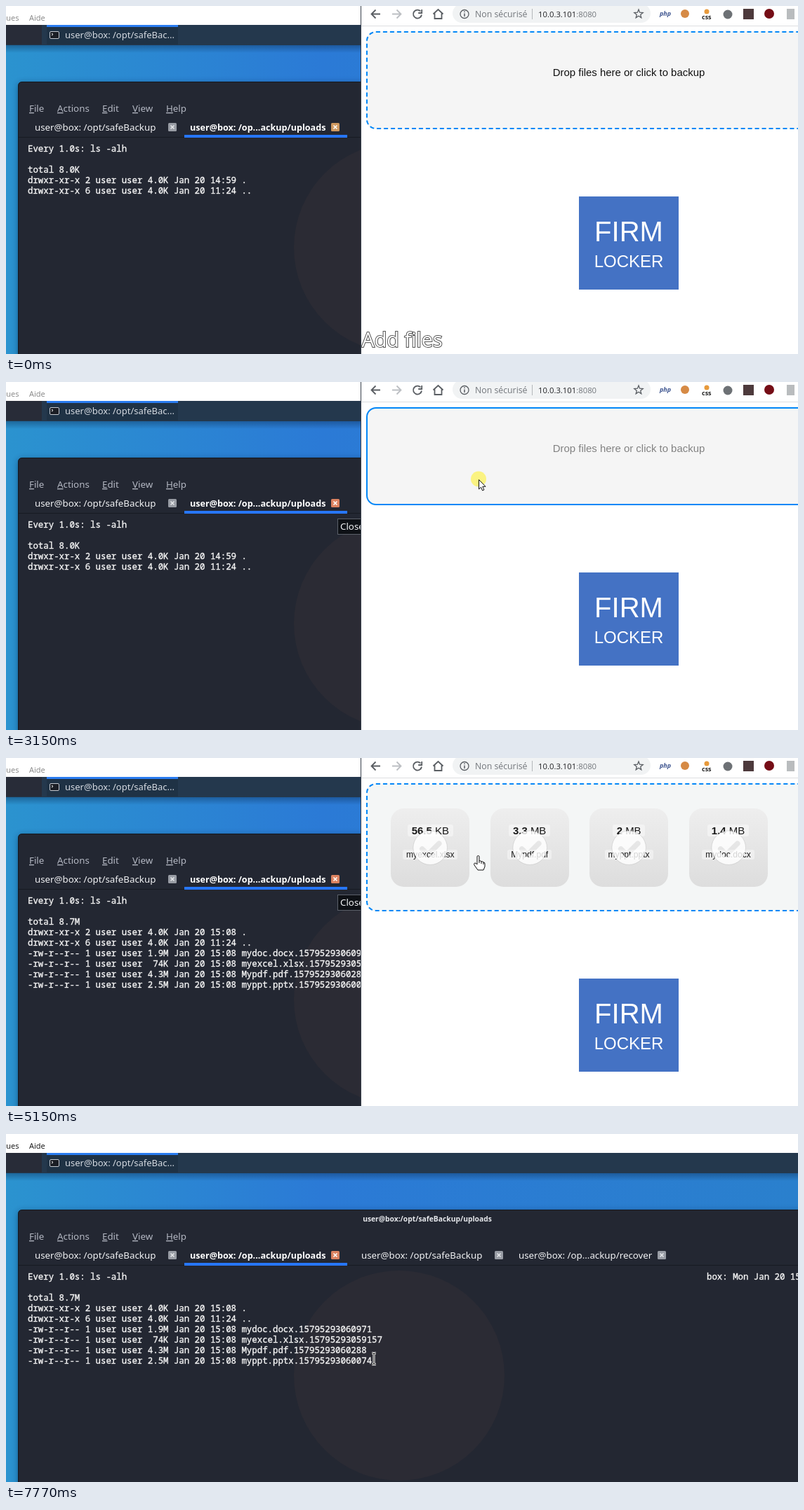
Write an HTML page that moves like this. It is 1128x497 px and loops after 8 s.

```html
<!DOCTYPE html>
<html lang="fr">
<head>
<meta charset="utf-8">
<title>Backup upload</title>
<style>
  html, body { margin: 0; width: 100%; height: 100%; overflow: hidden; background: #fff; }
  #stage { position: relative; width: 1128px; height: 497px; overflow: hidden; }
  #stage > svg { position: absolute; left: 0; top: 0; }
  svg { display: block; }
  .ui { font: 13.3px "Noto Sans", sans-serif; fill: #f2f3f5; }
  .bold { font: bold 12.6px "Noto Sans", sans-serif; fill: #fff; }
  .title { font: bold 10.3px "Noto Sans", sans-serif; fill: #e6e8ec; text-anchor: middle; }
  .menu { fill: #b4b8c3; }
  .menu tspan { text-decoration: underline; }
  .mono { font: 500 12.38px "Noto Sans Mono", monospace; fill: #f6f6f6; stroke: #f6f6f6;
    stroke-width: .35px; white-space: pre; }
  .bar { font: 11px "Open Sans", sans-serif; }
  #browser { position: absolute; left: 505px; top: 0; width: 623px; height: 497px;
    overflow: hidden; background: #fff; }
  #browser > * { position: absolute; }
  #zone { box-sizing: border-box; left: 8px; top: 36px; width: 748px; height: 140px;
    border: 2px dashed #0087f7; border-radius: 14px; background: #f5f5f5; }
  #message { position: absolute; left: 0; right: 0; top: 48px; text-align: center;
    font: 14.93px/17px "Liberation Sans", sans-serif; color: #111; }
  .tile { position: absolute; top: 34px; width: 112px; height: 112px; border-radius: 18.7px;
    overflow: hidden; background: linear-gradient(#eee, #ddd); text-align: center;
    font-family: "Liberation Sans", sans-serif; color: rgba(0,0,0,.9); }
  .tile p { position: absolute; left: 0; right: 0; margin: 0; white-space: nowrap; }
  .tile p span { padding: 0 .4em; border-radius: 3px; background: rgba(255,255,255,.4); }
  .size { top: 23px; font-size: 14.93px; line-height: 18px; }
  .name { top: 57px; font-size: 12.1px; line-height: 18px; }
  .progress { position: absolute; left: 19px; top: 48px; width: 74px; height: 15px;
    border-radius: 7.5px; overflow: hidden; background: rgba(255,255,255,.9); }
  .fill { height: 100%; background: linear-gradient(#666, #444); }
  .mark { position: absolute; left: 31px; top: 31px; }
  #logo { left: 311px; width: 142px; height: 133px; background: #4472c4; color: #fff;
    text-align: center; font-family: "Liberation Sans", sans-serif; }
  #logo div { position: absolute; left: 0; right: 0; line-height: 1; }
  #caption { left: 0; top: 457px; }
</style>
</head>
<body>
<div id="stage">
  <svg id="desktop" width="1128" height="497">
    <defs>
      <linearGradient id="sky">
        <stop offset="0" stop-color="#2b93cf"/>
        <stop offset=".4" stop-color="#2b7ad6"/>
        <stop offset="1" stop-color="#2a80cd"/>
      </linearGradient>
      <linearGradient id="shade" x2="0" y2="1">
        <stop offset="0" stop-color="#0a2a50" stop-opacity=".45"/>
        <stop offset="1" stop-color="#0a2a50" stop-opacity="0"/>
      </linearGradient>
      <filter id="soft"><feGaussianBlur stdDeviation="4"/></filter>
      <mask id="check" maskUnits="userSpaceOnUse" x="0" y="0" width="54" height="54">
        <rect width="54" height="54" fill="#fff"/>
        <path d="M14.7 28.8L23.5 37.5L40.5 20.5" fill="none" stroke="#000" stroke-width="8"
          stroke-linecap="round" stroke-linejoin="round"/>
      </mask>
      <path id="beamShape" d="M-3 -8H-1L0 -7L1 -8H3M0 -7V7M-3 8H-1L0 7L1 8H3"/>
    </defs>
    <rect width="1128" height="497" fill="url(#sky)"/>
    <rect y="55" width="1128" height="12" fill="url(#shade)"/>
    <rect width="1128" height="27" fill="#fff"/>
    <g id="hostMenu" class="bar">
      <text x="18.5" y="21" text-anchor="end">ques</text><text x="33" y="21">Aide</text>
    </g>
    <rect y="27" width="1128" height="29" fill="#24384d"/>
    <rect y="27" width="51" height="28" fill="#282c38"/>
    <rect x="58" y="27" width="187" height="28" fill="#1f3245"/>
    <rect x="58" y="27" width="187" height="3" fill="#2a7cf0"/>
    <rect x="62.5" y="36.5" width="13" height="10" rx="1.5" fill="#1b1e25" stroke="#c4c8cf"/>
    <path d="M65 39l2 1.5l-2 1.5" fill="none" stroke="#fff"/>
    <text class="ui" x="84" y="46" style="font-size:13px;fill:#d5dae1">user@box: /opt/safeBac...</text>

    <rect x="17" y="110" width="1130" height="420" rx="6" fill="#06203f" opacity=".5" filter="url(#soft)"/>
    <path d="M17.5 498V114Q17.5 108.5 23 108.5H1129V498Z" fill="#232732" stroke="#14181f"/>
    <circle cx="560" cy="345" r="150" fill="#2b2b34"/>
    <text class="title" x="600" y="125">user@box:/opt/safeBackup/uploads</text>
    <g id="tabs"></g>
    <rect x="18" y="187" width="1110" height="1" fill="#171a22"/>
    <rect x="254" y="184" width="232" height="4" fill="#2777ff"/>
    <g id="listing"></g>
    <text class="mono" x="998" y="208">box: Mon Jan 20 15:08:34 2020</text>
    <g id="tooltip">
      <rect x="472.5" y="195.5" width="44" height="22" fill="#0e1116" stroke="#5b6069"/>
      <text class="ui" x="476" y="211">Close</text>
    </g>
  </svg>

  <div id="browser">
    <svg width="623" height="29" viewBox="505 0 623 29" fill="none" stroke="#5a5e63" stroke-width="1.8">
      <path d="M505 28.5H1128" stroke="#dcdee1" stroke-width="1"/>
      <path d="M533 11.5H520.5M526.5 5.5l-6 6l6 6"/>
      <path d="M550 11.5H562.5M556.5 5.5l6 6l-6 6" stroke="#bcbfc3"/>
      <path d="M590.5 7.5A6 6 0 1 0 592 12.5M592.2 5v5h-5"/>
      <path d="M608.5 11.5L615.5 5l7 6.5M610.5 10.5V18h10V10.5"/>
      <rect x="636" y="-3" width="282" height="27" rx="13.5" fill="#f1f3f4" stroke="none"/>
      <circle cx="653" cy="11.5" r="6" stroke-width="1.3"/>
      <path d="M653 10.5v4.5M653 7.5v1.5" stroke-width="1.5"/>
      <path d="M749.5 4v15" stroke="#b4b7bb" stroke-width="1"/>
      <path id="star" stroke-width="1.3"/>
      <g class="bar" stroke="none" fill="#72767b">
        <text x="668" y="16" font-size="12.3">Non sécurisé</text>
        <text x="758" y="16" font-size="11.3"><tspan fill="#202124">10.0.3.101</tspan>:8080</text>
        <text x="931" y="14" font-size="9" font-weight="bold" font-style="italic" fill="#3f5690">php</text>
        <text x="991" y="19" font-size="9" font-weight="bold" fill="#222">css</text>
      </g>
      <g stroke="none">
        <circle cx="967" cy="11" r="6" fill="#d68a45"/>
        <circle cx="998" cy="8" r="3.5" fill="#e79a3c"/>
        <circle cx="1028" cy="12" r="6.5" fill="#6d7175"/>
        <rect x="1050" y="4" width="15" height="15" fill="#4d3a3c"/>
        <circle cx="1087" cy="11" r="7" fill="#750d16"/>
        <rect x="1112" y="4" width="11" height="15" fill="#b9bcbe"/>
      </g>
    </svg>
    <div id="zone"><div id="message">Drop files here or click to backup</div><div id="tiles"></div></div>
    <div id="logo">
      <div style="top:30px;font-size:40px">FIRM</div>
      <div style="top:81px;font-size:24px">LOCKER</div>
    </div>
    <svg id="caption" width="140" height="40">
      <text x="1.5" y="30" font-family="Open Sans, sans-serif" font-size="28.8" fill="#fff"
        stroke="#555" stroke-width="2" paint-order="stroke">Add files</text>
    </svg>
    <div style="left:0;top:0;width:1px;height:497px;background:#39414d"></div>
  </div>

  <svg width="1128" height="497">
    <g id="arrow">
      <circle cy="-.5" r="11" fill="#fff23c" opacity=".62"/>
      <path d="M.5 .5V14L3.5 11.2L5.6 16L7.9 15L5.8 10.3H10Z" fill="#fff" stroke="#111"/>
    </g>
    <path id="hand" d="M-2 12V2Q-2 .5 -.5 .5T1 2V8Q3 7 4 9Q6 8 7 10Q9 9.5 9 12V16L7 21H-1L-6 14Q-7 12 -5.5 11Q-4 10.5 -2 13ZM1 8V11M4 9V12M7 10V13"
      fill="#fff" stroke="#111"/>
    <g id="beam" fill="none">
      <use href="#beamShape" stroke="#fff" stroke-width="3"/>
      <use href="#beamShape" stroke="#111"/>
    </g>
  </svg>
</div>

<script>
const $ = id => document.getElementById(id);
const all = selector => document.querySelectorAll(selector);
const clamp = v => Math.min(1, Math.max(0, v));
const easeInOut = p => p < .5 ? 8 * p ** 4 : 1 - 8 * (1 - p) ** 4;
const show = (id, on) => $(id).style.display = on ? "" : "none";
const LOOP = 8000;

$("star").setAttribute("d", "M" + Array.from({ length: 10 }, (_, i) => {
  const a = i * Math.PI / 5, r = i % 2 ? 2.8 : 6.5;
  return [901 + r * Math.sin(a), 11.5 - r * Math.cos(a)].map(v => v.toFixed(1));
}).join("L") + "Z");

const menus = [["File", 33], ["Actions", 73], ["Edit", 137], ["View", 180], ["Help", 228]];
const tabs = [["/opt/safeBackup", 41, 237], ["/op...ackup/uploads", 262, 469],
  ["/opt/safeBackup", 506, 702], ["/op...ackup/recover", 730, 934]];
$("tabs").innerHTML = menus.map(([word, x]) =>
  `<text class="ui menu" x="${x}" y="151"><tspan>${word[0]}</tspan>${word.slice(1)}</text>`).join("") +
  tabs.map(([path, x, close], i) => `
    <text class="${i === 1 ? "bold" : "ui"}" x="${x}" y="178">user@box: ${path}</text>
    <rect ${i === 1 ? 'id="close"' : ""} x="${close - 6}" y="167" width="12" height="12" rx="1.5" fill="#989ca4"/>
    <path d="M${close - 2.5} 170.5l5 5m0 -5l-5 5" stroke="${i === 1 ? "#fff" : "#e4e6e9"}" stroke-width="1.6"/>`).join("");

const files = [["1.9M", "mydoc.docx.15795293060971"], [" 74K", "myexcel.xlsx.15795293059157"],
  ["4.3M", "Mypdf.pdf.15795293060288"], ["2.5M", "myppt.pptx.15795293060074"]];

function listing(total, changed, shown) {
  const row = (mode, links, size, date, name) => `${mode} ${links} user user ${size} Jan 20 ${date} ${name}`;
  const lines = ["Every 1.0s: ls -alh", "", "total " + total,
    row("drwxr-xr-x", 2, "4.0K", changed, "."), row("drwxr-xr-x", 6, "4.0K", "11:24", ".."),
    ...shown.map(([size, name]) => row("-rw-r--r--", 1, size, "15:08", name))];
  return lines.map((line, i) => `<text class="mono" x="31" y="${208 + 15 * i}">${line}</text>`).join("");
}
const listings = [listing("8.0K", "14:59", []),
  listing("2.6M", "15:08", [files[1], files[3]]), listing("8.7M", "15:08", files)];
let listed = -1;

$("tiles").innerHTML = [["56.5", "KB", "myexcel.xlsx"], ["3.3", "MB", "Mypdf.pdf"],
  ["2", "MB", "myppt.pptx"], ["1.4", "MB", "mydoc.docx"]].map(([size, unit, name], i) => `
  <div class="tile" style="left:${33.3 + 141.4 * i}px">
    <p class="size"><span><b>${size}</b> ${unit}</span></p>
    <p class="name"><span>${name}</span></p>
    <div class="progress"><div class="fill"></div></div>
    <svg class="mark" width="50.4" height="50.4" viewBox="0 0 54 54">
      <circle cx="27" cy="27" r="26" fill="#fff" fill-opacity=".816" stroke="#747474"
        stroke-opacity=".2" mask="url(#check)"/>
    </svg>
  </div>`).join("");

function pointer(t, q) {
  if (t < 1900) return null;
  if (q <= 2650) {
    const p = clamp((q - 1900) / 750);
    return ["arrow", 7 + 610 * (1 - (1 - p) ** 1.44), 279 - 167 * p ** 2.15];
  }
  if (t < 3880) {
    const p = clamp((q - 2650) / 500);
    return ["arrow", 617 + 56 * p, 112 + 27 * p];
  }
  if (t < 5400) return ["hand", 673, 139];
  if (t < 5520) return ["arrow", 536, 270];
  const p = 1 - (1 - clamp((q - 6900) / 875)) ** 2;
  return ["beam", 400 + 124 * p, 402 - 81 * p];
}

function draw(t) {
  const q = Math.floor((t - 15) / 125) * 125 + 25;
  const dropped = t >= 3880, dragging = t >= 2770 && !dropped, full = t >= 6900;

  show("browser", !full);
  show("caption", t < 130);
  show("tooltip", t >= 2890 && t < 5770);
  show("message", !dropped);
  show("tiles", dropped);
  $("hostMenu").setAttribute("fill", full ? "#111" : "#858585");
  $("close").setAttribute("fill", t < 1900 ? "#cf985f" : "#dc8260");

  const zone = $("zone").style;
  zone.height = dropped ? "183px" : "140px";
  zone.background = dropped ? "#f4f6f6" : "#f5f5f5";
  zone.borderStyle = dragging ? "solid" : "dashed";
  $("message").style.opacity = dragging ? .5 : 1;
  $("logo").style.top = dropped ? "315px" : "272px";

  const state = t < 4145 ? 0 : t < 5020 ? 1 : 2;
  if (state !== listed) $("listing").innerHTML = listings[listed = state];

  const rise = easeInOut(clamp((q - 4000) / 900)), leave = easeInOut(clamp((q - 6100) / 900));
  all(".mark").forEach(mark => {
    mark.style.opacity = rise * (1 - leave);
    mark.style.transform = `translateY(${37 * (1 - rise - leave)}px)`;
  });
  all(".progress").forEach(bar => bar.style.opacity = 1 - clamp((q - 4025) / 375) ** 2);
  all(".fill").forEach(fill => fill.style.width = 100 * clamp((q - 3900) / 250) + "%");

  const spot = pointer(t, q);
  for (const kind of ["arrow", "hand", "beam"]) show(kind, spot && spot[0] === kind);
  if (spot) $(spot[0]).setAttribute("transform", `translate(${spot[1].toFixed(1)} ${spot[2].toFixed(1)})`);
}

const start = performance.now();
function tick() {
  draw((performance.now() - start) % LOOP);
  requestAnimationFrame(tick);
}
tick();
</script>
</body>
</html>
```
